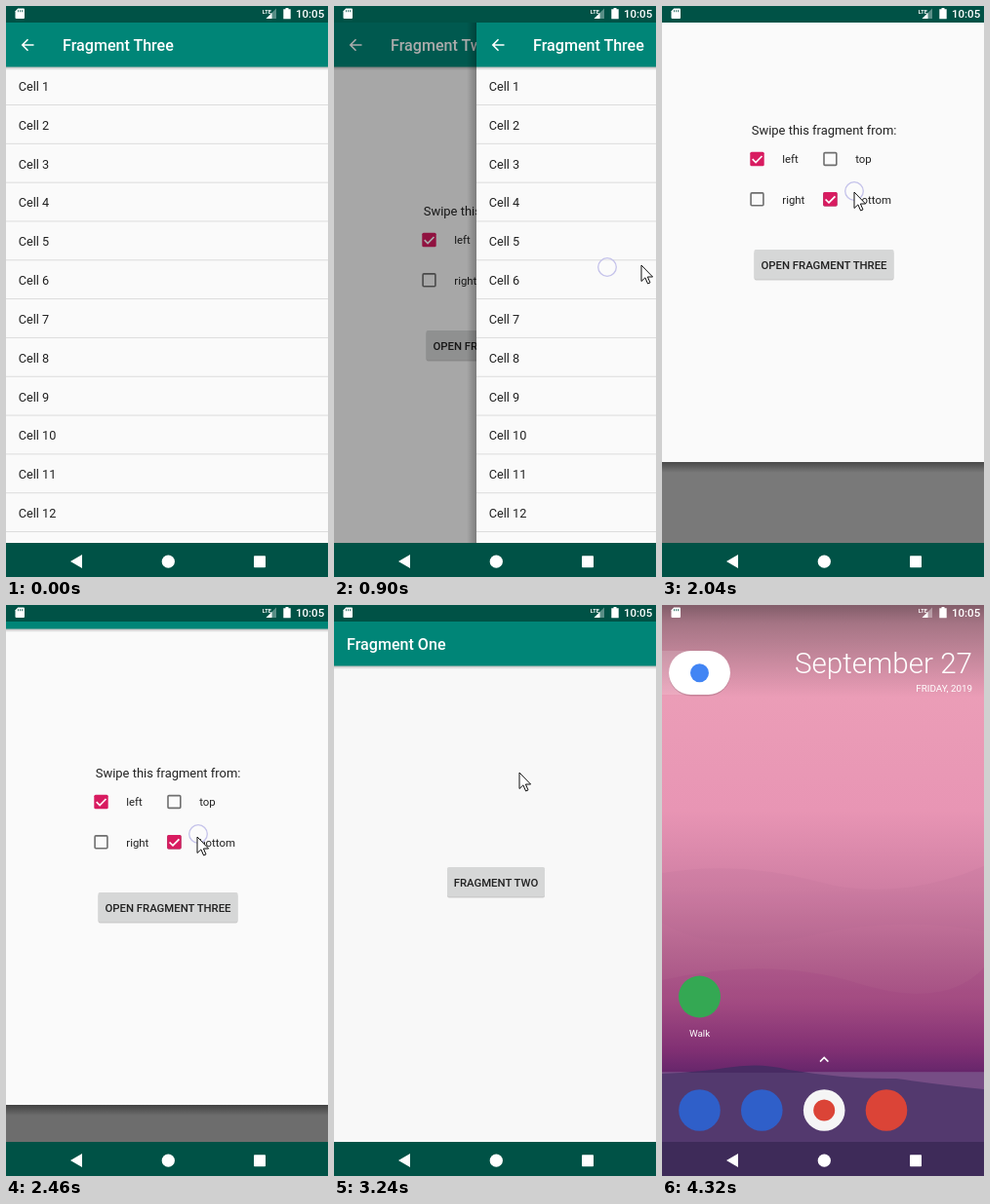
An HTML page for the animation above (4980 ms loop, 330 by 586 pixels).

```html
<!DOCTYPE html>
<html lang="en">
<head>
<meta charset="utf-8">
<title>Swipe back</title>
<style>
html, body { margin: 0; height: 100%; overflow: hidden; background: #fafafa; }
svg { display: block; width: 100vw; height: 100vh; font-family: Roboto, sans-serif; }
</style>
</head>
<body>
<svg id="stage" viewBox="0 0 330 586"></svg>
<script>
const LOOP = 4980, STEP = 60;
const DARK = '#005246', TEAL = '#008577', INK = '#212121', ACCENT = '#d81b60';

const rect = (x, y, w, h, fill, more = '') =>
  `<rect x="${x}" y="${y}" width="${w}" height="${h}" fill="${fill}" ${more}/>`;
const disc = (x, y, r, fill) => `<circle cx="${x}" cy="${y}" r="${r}" fill="${fill}"/>`;
const path = (d, more) => `<path d="${d}" ${more}/>`;
const text = (x, y, size, str, fill = INK, more = '') =>
  `<text x="${x}" y="${y}" font-size="${size}" fill="${fill}" ${more}>${str}</text>`;
const scrim = id => rect(0, 0, 330, 586, '#000', `id="${id}"`);
const gradient = (id, dir, stops) => `<linearGradient id="${id}" x1="0" y1="0" ${dir}>` +
  stops.map(([at, color, alpha = 1]) =>
    `<stop offset="${at}" stop-color="${color}" stop-opacity="${alpha}"/>`).join('') +
  '</linearGradient>';

const toolbar = (title, back) =>
  rect(0, 62, 330, 4, 'url(#down)', 'opacity=".7"') + rect(0, 17, 330, 45.5, TEAL) +
  (back ? path('M28.5 40H17M22.5 34.3L16.8 40l5.7 5.7', 'fill="none" stroke="#fff" stroke-width="1.6"') : '') +
  text(back ? 58 : 13, 46, 16.1, title, '#fff', 'font-weight="500"');

const button = (x, y, w, label) =>
  rect(x, y + 1.5, w, 30, '#000', 'rx="2" opacity=".18"') +
  rect(x, y, w, 30, '#d6d7d7', 'rx="1.5"') +
  text(x + w / 2, y + 19.5, 11.35, label, INK, 'font-weight="500" text-anchor="middle"');

const emptyBox = (x, y) => rect(x - 6.4, y - 6.4, 12.8, 12.8, '#fafafa', 'rx="1" stroke="#6e6e6e" stroke-width="1.6"');
const tickedBox = (x, y) => rect(x - 7.2, y - 7.2, 14.4, 14.4, ACCENT, 'rx="1.5"') +
  path(`M${x - 4.8} ${y + .2}l3.4 3.4l6.4-6.6`, 'fill="none" stroke="#fff" stroke-width="1.7"');
const option = (x, y, label, ticked) =>
  (ticked ? tickedBox : emptyBox)(x, y) + text(x + 25.8, y + 4.2, 11.4, label);

const home =
  rect(0, 0, 330, 586, 'url(#sky)') +
  path('M0 275Q80 262 160 284T330 268V335Q240 318 150 340T0 326Z', 'fill="#a8608f" opacity=".12"') +
  path('M0 385Q110 360 200 388T330 372V480H0Z', 'fill="#93337a" opacity=".14"') +
  path('M0 479H330V500H0Z', 'fill="#744580"') +
  path('M0 481Q40 479 65 475Q100 469 130 477Q190 487 240 486Q290 493 330 497V586H0Z', 'fill="#482b63"') +
  rect(0, 480, 330, 106, '#7d6a98', 'opacity=".22"') +
  rect(0, 551, 330, 35, '#20183a', 'opacity=".4"') +
  rect(0, 0, 330, 95, 'url(#shade)') +
  rect(0, 47, 30, 45, '#fff', 'opacity=".15"') +
  rect(7, 48, 63, 45.5, '#000', 'rx="22.7" opacity=".15"') +
  rect(7, 47, 63, 45, '#fff', 'rx="22.5"') + disc(38.5, 69.8, 9.5, '#4285f4') +
  text(318, 70, 29.6, 'September 27', '#fff', 'font-weight="300" text-anchor="end"') +
  text(318, 89.3, 9.8, 'FRIDAY, 2019', '#fff', 'text-anchor="end"') +
  disc(38.5, 402, 21.5, '#34a853') +
  text(38.5, 443, 9.8, 'Walk', '#fff', 'text-anchor="middle"') +
  path('M162 468.6l4.2-4.2l4.2 4.2', 'fill="none" stroke="#fff" stroke-width="1.5"') +
  disc(38.5, 518.5, 21.3, '#2f5fc9') + disc(102.3, 518.5, 21.3, '#2f5fc9') +
  disc(166.2, 518.5, 21.3, '#f5f5f5') + disc(166.2, 518.5, 11, '#db4437') +
  disc(230, 518.5, 21.3, '#db4437');

const one = rect(0, 17, 330, 534, '#f8f8f8') + toolbar('Fragment One') +
  button(116, 269, 100, 'FRAGMENT TWO');

const two = rect(0, 551, 330, 11, 'url(#down)') + rect(0, 17, 330, 534, '#fafafa') +
  toolbar('Fragment Two', true) +
  text(91.8, 215, 12.95, 'Swipe this fragment from:') +
  option(97.5, 240, 'left', true) + option(172.4, 240, 'top') +
  option(97.5, 281.3, 'right') + option(172.4, 281.3, 'bottom') +
  `<g id="tick">${tickedBox(172.4, 281.3)}</g>` +
  button(94.5, 333, 143, 'OPEN FRAGMENT THREE');

const cells = Array.from({ length: 12 }, (_, i) =>
  text(12.8, 87 + i * 39.82, 12.7, 'Cell ' + (i + 1)) +
  rect(0, 101 + i * 39.82, 330, 1, '#dcdcdc')).join('');
const three = rect(-10, 17, 10, 534, 'url(#left)') + rect(0, 17, 330, 534, '#fafafa') +
  cells + toolbar('Fragment Three', true);

const icons =
  path('M12.2 2.5H18a1 1 0 0 1 1 1V12a1 1 0 0 1-1 1H10.500a1 1 0 0 1-1-1V5.200Z', 'fill="#fff"') +
  path('M12.5 4.2v2M14.500 4.2v2M16.500 4.2v2', `stroke="${DARK}" stroke-width=".8"`) +
  text(262.8, 7.6, 5.6, 'LTE', '#fff', 'font-weight="700"') +
  path('M277 2.500V13H266.500Z', 'fill="#fff" opacity=".35"') +
  path('M272.500 7V13H266.500Z', 'fill="#fff"') +
  path('M286.500 2h3v1.200h2.200V13.300h-7.400V3.200h2.200Z', 'fill="#fff"') +
  text(326.2, 12.3, 11.5, '10:05', '#fff', 'font-weight="500" text-anchor="end"') +
  path('M66 570L78 563V577Z', 'fill="#fff"') + disc(166.3, 570.2, 6.6, '#fff') +
  rect(254, 564.2, 12, 12, '#fff', 'rx=".8"');

document.getElementById('stage').innerHTML = `<defs>
  ${gradient('sky', 'x2="0" y2="1"', [[0, '#e0a0b5'], [.16, '#eb9db7'], [.36, '#e895b4'],
    [.5, '#cf7ea3'], [.6, '#b66690'], [.7, '#a34d82'], [.78, '#7d2f72'], [.83, '#552066']])}
  ${gradient('shade', 'x2="0" y2="1"', [[0, '#000', .42], [.2, '#000', .27], [1, '#000', 0]])}
  ${gradient('down', 'x2="0" y2="1"', [[0, '#000', .4], [1, '#000', 0]])}
  ${gradient('left', 'x2="1" y2="0"', [[0, '#000', 0], [1, '#000', .25]])}
  <clipPath id="body">${rect(0, 17, 330, 534, '#000')}</clipPath>
  </defs>
  ${home}${scrim('homeDim')}
  <g id="app">
    ${rect(-10, 0, 10, 586, 'url(#left)')}${rect(0, 0, 330, 586, DARK)}
    <g clip-path="url(#body)">
      ${one}${scrim('oneDim')}<g id="two">${two}</g>
      ${scrim('twoDim')}<g id="three">${three}</g>
    </g>
  </g>
  ${icons}
  <circle id="touch" r="9.3" fill="#fff" fill-opacity=".25" stroke="#c4c2ea" stroke-width="1.3"/>
  ${path('M0 0V16.500L3.900 12.900L6.600 19L9 17.900L6.400 12H11.600Z', 'id="mouse" fill="#fff" stroke="#111" stroke-width="1"')}`;

const el = Object.fromEntries([...document.querySelectorAll('#stage [id]')].map(e => [e.id, e]));

// Keys are [time, value, ...]; values in between are linear.
function at(keys, t) {
  const i = keys.findIndex(k => k[0] > t);
  if (i < 0) return keys.at(-1).slice(1);
  if (i === 0) return keys[0].slice(1);
  const a = keys[i - 1], b = keys[i], f = (t - a[0]) / (b[0] - a[0]);
  return a.slice(1).map((v, j) => v + (b[j + 1] - v) * f);
}

const threeX = [[600, 3], [660, 12], [720, 32], [780, 62], [840, 100], [900, 146],
  [960, 210], [1020, 280], [1080, 330]];
const twoY = [[1560, 0], [1620, -4], [1680, -14], [1800, -58], [1860, -76], [1920, -84],
  [2040, -83], [2160, -83], [2220, -80], [2340, -62], [2460, -38], [2580, -24], [2640, -22],
  [2700, -22], [2760, -26], [2820, -42], [2880, -68], [2940, -104], [3000, -180],
  [3120, -410], [3180, -510], [3240, -551]];
const appX = [[3600, 0], [3660, 12], [3720, 50], [3780, 108], [3840, 178], [3900, 249],
  [3960, 286], [4020, 307], [4080, 319], [4140, 325], [4260, 329], [4320, 330]];
const mousePath = [[0, 345, 100], [60, 320, 109], [180, 250, 170], [360, 95, 255], [420, 63, 276],
  [540, 105, 283], [600, 140, 281], [720, 185, 276], [840, 270, 270], [900, 315, 266],
  [960, 345, 262], [1140, 345, 255], [1200, 300, 259], [1380, 203, 278], [1560, 200, 273],
  [1620, 200, 268], [1680, 199, 256], [1800, 198, 208], [1920, 197, 189], [2040, 197, 191],
  [2160, 197, 191], [2340, 196, 214], [2460, 196, 238], [2640, 196, 251], [2700, 196, 251],
  [2760, 196, 243], [2880, 196, 166], [2940, 197, 130], [3000, 196, 112], [3120, 192, 135],
  [3240, 190, 172], [3300, 172, 185], [3480, 64, 204], [3600, 50, 203], [3660, 72, 202],
  [3720, 130, 201], [3780, 200, 201], [3840, 270, 201], [3900, 345, 201]];

const move = (e, x, y) => e.setAttribute('transform', `translate(${x} ${y})`);
const dim = (e, gone) => e.setAttribute('opacity', .6 * (1 - gone));
const show = (e, on) => e.setAttribute('visibility', on ? 'visible' : 'hidden');

function touchAt(t, x3, y2, x0) {
  if (t >= 540 && t <= 960) return [134 + x3, 282 - 14 * Math.min(1, (t - 540) / 360)];
  if (t >= 1380 && t <= 1440) return [202, 279];
  if (t >= 1560 && t <= 2940) return [t > 2700 ? 193 : 197, 273 + y2];
  if (t >= 3600 && t <= 3900) return [50 + x0, 201];
}

function draw(now) {
  const t = Math.floor(now % LOOP / STEP) * STEP;
  const x3 = t < 600 ? 0 : at(threeX, t)[0];
  const [y2] = at(twoY, t), [x0] = at(appX, t);
  move(el.three, x3 >= 330 ? 345 : x3, 0);
  move(el.two, 0, y2 <= -551 ? -600 : y2);
  move(el.app, x0 >= 330 ? 345 : x0, 0);
  dim(el.twoDim, x3 / 330);
  dim(el.oneDim, -y2 / 551);
  dim(el.homeDim, x0 / 330);
  show(el.tick, t >= 1440);
  const touch = touchAt(t, x3, y2, x0);
  show(el.touch, touch);
  if (touch) move(el.touch, ...touch);
  move(el.mouse, ...at(mousePath, t));
}

let start;
function tick(now) {
  start ??= now;
  draw(now - start);
  requestAnimationFrame(tick);
}
draw(0);
requestAnimationFrame(tick);
</script>
</body>
</html>
```
